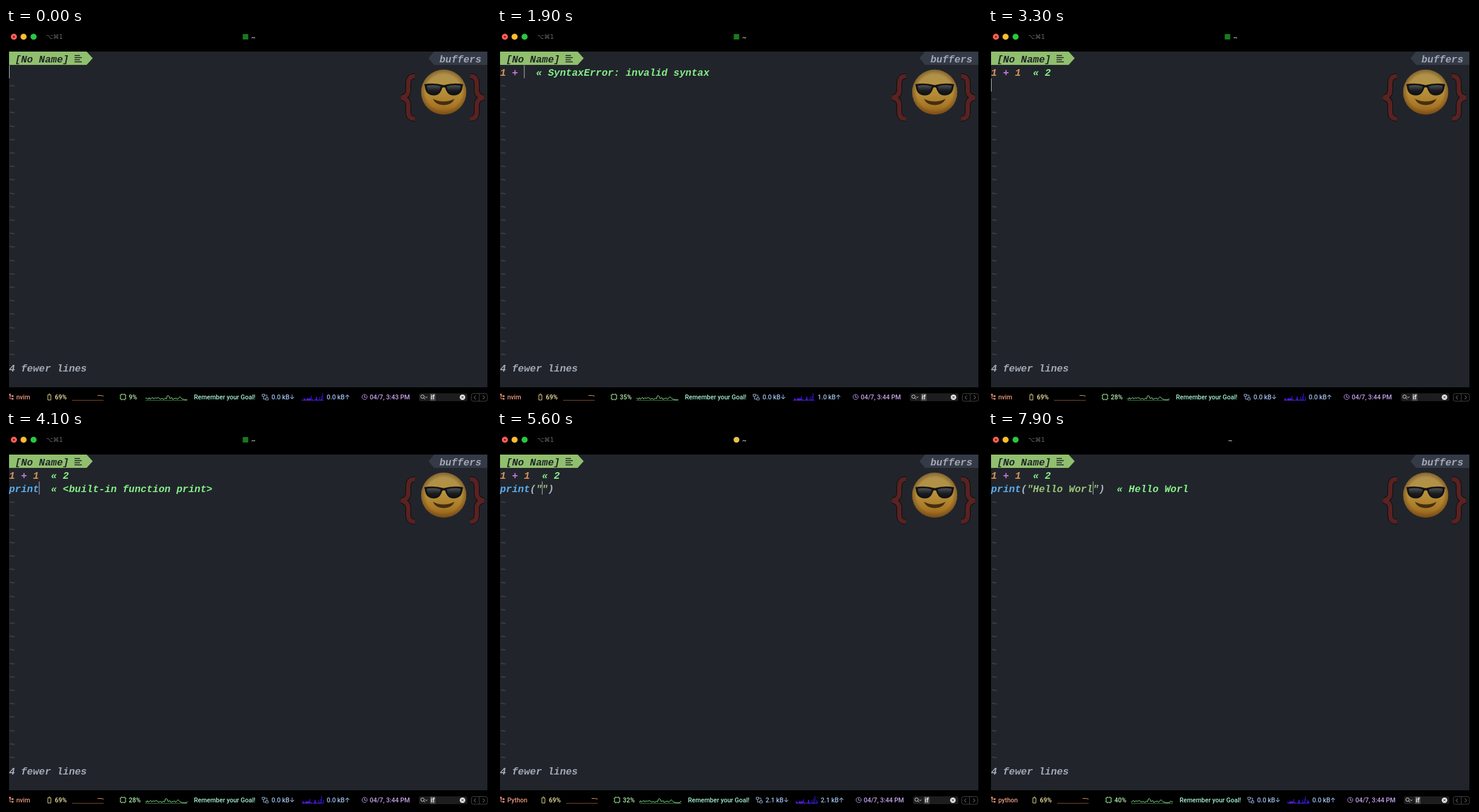
Animation, 800 px wide and 620 px high, one loop 8 s. Source, as an HTML page:

```html
<!DOCTYPE html>
<html lang="en">
<head>
<meta charset="utf-8">
<title>Live evaluation in a terminal editor</title>
<style>
  html, body { margin: 0; width: 100%; height: 100%; overflow: hidden; background: #000; }
  svg { display: block; }
  text { white-space: pre; }
  .code { font: italic bold 16.45px "Liberation Mono", monospace; }
  .bar { font: 500 10.5px Roboto, Inter, sans-serif; }
  .line { fill: none; stroke-width: 1; }
</style>
</head>
<body>
<svg width="800" height="620" viewBox="0 0 800 620">
  <defs>
    <linearGradient id="skin" x2="0" y2="1">
      <stop offset="0" stop-color="#ab9150"/>
      <stop offset=".45" stop-color="#b8923c"/>
      <stop offset=".8" stop-color="#a97826"/>
      <stop offset="1" stop-color="#8c5a1a"/>
    </linearGradient>
    <radialGradient id="rim">
      <stop offset=".78" stop-color="#6b4214" stop-opacity="0"/>
      <stop offset="1" stop-color="#6b4214" stop-opacity=".6"/>
    </radialGradient>
    <linearGradient id="lens" x2="0" y2="1">
      <stop offset="0" stop-color="#505254"/>
      <stop offset=".6" stop-color="#1b1d20"/>
      <stop offset="1" stop-color="#111316"/>
    </linearGradient>
    <path id="brace" d="M674.500 79.500Q663.500 79.500 663.500 92V103Q663.500 113 652 115Q663.500 117.500 663.500 127V139Q663.500 150 674.500 150"/>
    <g id="braceShape" fill="none">
      <use href="#brace" stroke="#14100f" stroke-width="9.500"/>
      <use href="#brace" stroke="#5a2222" stroke-width="7"/>
    </g>
  </defs>

  <rect width="800" height="620"/>
  <rect x="5" y="39" width="789" height="555" fill="#21252b"/>

  <!-- title bar -->
  <circle cx="13" cy="14.5" r="5" fill="#ff5f57"/>
  <circle cx="13" cy="14.5" r="1.6" fill="#7d120c"/>
  <circle cx="29" cy="14.5" r="5" fill="#febc2e"/>
  <circle cx="45.5" cy="14.5" r="5" fill="#28c840"/>
  <text x="66" y="18" font-family="'DejaVu Sans', sans-serif" font-size="10" fill="#686868">⌥⌘1</text>
  <rect id="editorMark" x="390.5" y="10" width="9" height="9" fill="#187a1c"/>
  <circle id="shellMark" cx="395" cy="14.5" r="4.8" fill="#e3c44c"/>
  <text id="title" x="404" y="18.5" class="bar" fill="#c0c0c0">~</text>

  <!-- face between braces -->
  <use href="#braceShape"/>
  <use href="#braceShape" transform="matrix(-1 0 0 1 1440 0)"/>
  <circle cx="722" cy="106" r="37.2" fill="url(#skin)"/>
  <circle cx="722" cy="106" r="37.2" fill="url(#rim)"/>
  <path d="M704 117Q722 126 740 117Q735 127.500 722 127.500Q709 127.500 704 117Z" fill="#432e11"/>
  <path d="M690 93Q706 90 722 94.500Q738 90 754 93L753 97Q752 111 738 111.500Q728 111.500 724.500 99Q722 97 719.500 99Q716 111.500 706 111.500Q692 111 691 97Z" fill="#111316"/>
  <path d="M694 95.500Q706 93 717 96.500Q715 109 706 109Q695 109 694 95.500ZM727 96.500Q738 93 750 95.500Q749 109 738 109Q729 109 727 96.500Z" fill="url(#lens)"/>

  <!-- tab line -->
  <path d="M5 39H133L143 50L133 61H5Z" fill="#90bf6e"/>
  <text x="14.9" y="56.5" class="code" fill="#20242a">[No Name]</text>
  <path d="M113 45.5h9M113 49h12M113 52.5h9M113 56h12" stroke="#20242a" stroke-width="1.3"/>
  <path d="M697 50L706 39H794V61H706Z" fill="#343a46"/>
  <text x="715" y="56.5" class="code" fill="#a2a9b6">buffers</text>

  <g id="tildes" class="code" fill="#3b4048"></g>
  <g id="code" class="code"></g>
  <rect id="cursor" width="1" height="21.5" fill="#b4bac4"/>
  <text x="5" y="567.5" class="code" fill="#a2a9b6">4 fewer lines</text>

  <!-- status bar -->
  <g class="bar">
    <g fill="#ec9a82">
      <path class="line" stroke="#ec8a74" d="M6.5 605V613H10M6.5 608.5H10"/>
      <circle cx="6.5" cy="606" r="1.5"/><circle cx="11" cy="608.5" r="1.5"/><circle cx="11" cy="613" r="1.5"/>
      <text id="job" x="17" y="614"></text>
    </g>
    <g id="battery" fill="#f3e6a0">
      <path class="line" stroke="#e8d888" d="M69 606.5h5v8.5h-5zM70.5 604.8h2"/>
      <text x="80.5" y="614">69%</text>
      <path class="line" stroke="#7a4a24" d="M109 615.5H161"/>
      <path class="line" stroke="#d99a5c" d="M151 607.5H156L161 608.5"/>
    </g>
    <g id="middle">
      <path class="line" stroke="#9ee596" stroke-width="1.2" d="M189 606h8v8h-8zM191 604.5v1.5M195 604.5v1.5M191 614v1.5M195 614v1.5M187.5 608h1.5M187.5 612h1.5M197 608h1.5M197 612h1.5"/>
      <text id="cpu" x="202.5" y="614" fill="#b2efaa"></text>
      <path class="line" stroke="#357a38" d="M230 615.5H299"/>
      <path id="cpuGraph" class="line" stroke="#8fe596"/>
      <text x="310" y="614" fill="#a5f1d2">Remember your Goal!</text>
      <path class="line" stroke="#8ba6c8" d="M422.5 605.5h4v3.5h-4zM428.5 611.5h4v3.5h-4zM424.5 609V613.5H428.5M426.5 607H430.5V611.5"/>
      <text id="down" x="438" y="614" fill="#a3c3f0"></text>
      <path id="netBars" class="line" stroke="#3517e0"/>
      <path id="netTips" class="line" stroke="#a52358"/>
      <text id="up" x="529" y="614" fill="#a3c3f0"></text>
      <g fill="none" stroke="#bb93e6"><circle cx="591.5" cy="610" r="4.2"/><path d="M591.5 607V610.5H594"/></g>
      <text id="clock" x="600" y="614" fill="#caa6ee"></text>
    </g>
    <rect id="field" x="681" y="604" width="80" height="13" rx="3" fill="#1d1d1f"/>
    <g id="search">
      <g class="line" stroke="#d6d6d6"><circle cx="687" cy="609.5" r="2.8"/><path d="M689 611.5L691.5 614M691.5 609.5L693.3 611.3L695 609.5"/></g>
      <rect x="699.5" y="604.5" width="9" height="12" fill="#4a4a4c"/>
      <text x="700.5" y="614" fill="#fff">if</text>
    </g>
    <g id="controls">
      <circle cx="753" cy="610.5" r="4.6" fill="#e2e2e2"/>
      <path d="M751.2 608.7l3.6 3.6M754.8 608.7l-3.6 3.6" stroke="#222"/>
      <g class="line" stroke="#434345"><rect x="767.5" y="604.5" width="26.5" height="12.5" rx="3"/><path d="M780.5 604.5v12.5"/></g>
      <path class="line" stroke="#8a8a8c" d="M775 607.5L772 610.7L775 614M786.5 607.5L789.5 610.7L786.5 614"/>
    </g>
  </g>
</svg>
<script>
const LOOP = 8000, COL = 9.872, ROW = 22.2, LEFT = 5;
const $ = id => document.getElementById(id);
const NS = "http://www.w3.org/2000/svg";
const color = {
  number: "#d8935a", operator: "#c678dd", call: "#5cacee",
  string: "#98c379", plain: "#abb2bf", result: "#86ee88"
};

// Each list holds [start time, value]; the last one reached applies.
const at = (list, t) => list.reduce((value, [start, next]) => t >= start ? next : value, list[0][1]);

const sumText = [[0, ""], [400, "1"], [800, "1 "], [1200, "1 +"], [1500, "1 + "], [2400, "1 + 1"]];
const sumResult = [[0, ""], [1700, "SyntaxError: invalid syntax"], [2400, ""], [2600, "2"]];
const newLine = 3000;
const calls = [[0, ""], [3500, "p"], [3600, "pr"], [3700, "pri"], [3800, "prin"], [3900, "print"],
  [4800, "print("], [5300, 'print("'], [5900, 'print("H'], [6100, 'print("He'], [6300, 'print("Hel'],
  [6450, 'print("Hell'], [6600, 'print("Hello'], [7150, 'print("Hello '], [7300, 'print("Hello W'],
  [7450, 'print("Hello Wo'], [7600, 'print("Hello Wor'], [7750, 'print("Hello Worl']];
const callResult = [[0, ""], [4000, "<built-in function print>"], [4800, ""], [6150, "H"], [6350, "He"],
  [6500, "Hel"], [6650, "Hell"], [6800, "Hello"], [7400, "Hello W"], [7600, "Hello Wo"],
  [7700, "Hello Wor"], [7850, "Hello Worl"]];

const jobs = [[0, "nvim"], [600, "Python"], [1300, "nvim"], [4400, "Python"], [7500, "python"]];
const cpuLoad = [[0, 9], [1000, 35], [2800, 28], [4900, 32], [6400, 42], [7400, 40]];
const downRate = [[0, "0.0"], [4900, "2.1"], [6400, "0.0"]];
const upRate = [[0, "0.0"], [1000, "1.0"], [2800, "0.0"], [4900, "2.1"], [6400, "0.0"]];
const samples = [[0, 0], [1000, 1], [2800, 2], [4900, 3], [6400, 4], [7400, 5]];

const noise = n => { const s = Math.sin(n * 127.1 + 11.7) * 43758.5453; return s - Math.floor(s); };

function write(parent, text, col, row, fill) {
  const el = document.createElementNS(NS, "text");
  el.setAttribute("x", LEFT + col * COL);
  el.setAttribute("y", 56.6 + row * ROW);
  if (fill) el.setAttribute("fill", fill);
  el.textContent = text;
  parent.append(el);
  return el;
}

const tildes = Array.from({ length: 21 }, (_, i) => write($("tildes"), "~", 0, i + 2));

function writeParts(parts, row) {
  let col = 0;
  for (const [text, fill] of parts) {
    if (text) write($("code"), text, col, row, fill);
    col += text.length;
  }
}

function resultPart(result) {
  return ["  « " + result, color.result];
}

function drawCode(t) {
  $("code").replaceChildren();
  const sum = at(sumText, t), sumOut = at(sumResult, t);
  const sumParts = [...sum].map(ch => [ch, ch === "+" ? color.operator : color.number]);
  if (sumOut) sumParts.push(resultPart(sumOut));
  writeParts(sumParts, 1);

  const call = at(calls, t), callOut = at(callResult, t);
  const quoted = call.includes('"');
  const callParts = [[call.slice(0, 5), color.call]];
  if (call.length > 5) {
    callParts.push(["(", color.plain]);
    if (quoted) callParts.push([call.slice(6) + '"', color.string]);
    callParts.push([")", color.plain]);
  }
  if (callOut) callParts.push(resultPart(callOut));
  writeParts(callParts, 2);

  const second = t >= newLine;
  tildes[0].style.display = second ? "none" : "";
  $("cursor").setAttribute("x", LEFT + (second ? call : sum).length * COL);
  $("cursor").setAttribute("y", second ? 83.5 : 61.5);
}

function cpuPath(step) {
  const points = [];
  for (let i = 0; i <= 46; i++) {
    const n = i + step;
    const peak = 6 * Math.exp(-((n - 25) ** 2) / 1.4) + 3 * Math.exp(-((n - 38) ** 2) / 2);
    const y = 612.7 - peak - (noise(n) - .5) * 3.2 + (n > 40 ? 1 : 0);
    points.push((230 + i * 1.5).toFixed(1) + " " + y.toFixed(1));
  }
  return "M" + points.join("L");
}

function drawNet(step) {
  let bars = "", tips = "";
  for (let i = 0; i < 36; i++) {
    const n = i + step, x = 488.5 + i;
    const h = 1 + noise(n + 80) ** 3 * 7 + (n === 34 ? 6 : 0);
    bars += `M${x} 616v${-h.toFixed(1)}`;
    if (noise(n + 300) > .8) tips += `M${x} 616v-2`;
  }
  $("netBars").setAttribute("d", bars);
  $("netTips").setAttribute("d", tips);
}

function drawStatus(t) {
  const job = at(jobs, t), step = at(samples, t);
  const shift = { nvim: 0, Python: 5, python: 6 }[job];
  const move = (id, x) => $(id).setAttribute("transform", `translate(${x})`);
  $("job").textContent = job;
  $("cpu").textContent = at(cpuLoad, t) + "%";
  $("down").textContent = at(downRate, t) + " kB↓";
  $("up").textContent = at(upRate, t) + " kB↑";
  $("clock").textContent = "04/7, 3:" + (t < 1000 ? 43 : 44) + " PM";
  $("cpuGraph").setAttribute("d", cpuPath(step));
  drawNet(step);
  move("battery", Math.min(shift, 5));
  move("middle", shift);
  move("search", Math.min(shift, 5));
  move("controls", job === "Python" ? -1 : 0);
  $("field").setAttribute("x", shift ? 686 : 681);
  $("field").setAttribute("width", shift ? 75 : 80);
  $("editorMark").style.display = job === "nvim" ? "" : "none";
  $("shellMark").style.display = job === "Python" ? "" : "none";
  $("title").setAttribute("x", job === "python" ? 396 : 404.5);
}

function draw(t) {
  drawCode(t);
  drawStatus(t);
}

const start = performance.now();
function tick() {
  draw((performance.now() - start) % LOOP);
  requestAnimationFrame(tick);
}
draw(0);
requestAnimationFrame(tick);
</script>
</body>
</html>
```
